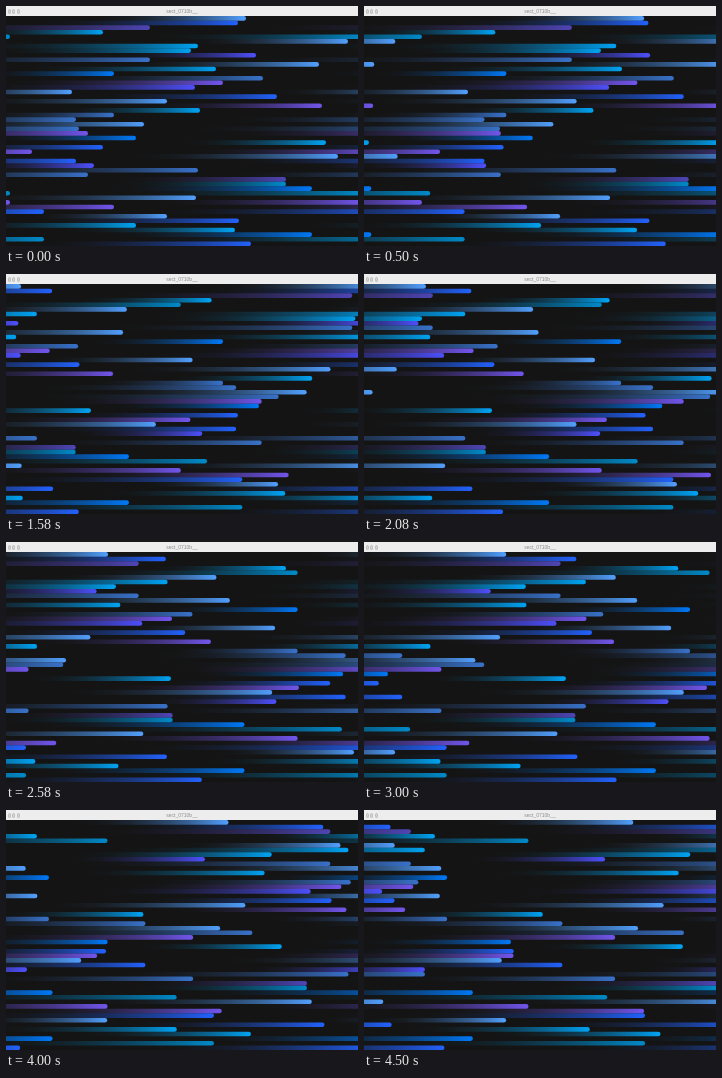
Write an HTML page with a canvas that moves like this. It is 352 by 240 pixels and loops after 4.58 s.

```html
<!DOCTYPE html>
<html lang="en">
<head>
<meta charset="utf-8">
<title>Streaks</title>
<style>
  html, body { margin: 0; width: 352px; height: 240px; overflow: hidden; background: #141414; }
  canvas { position: absolute; left: 0; top: 0; }
  header {
    position: absolute; left: 0; top: 0; width: 352px; height: 10px;
    background: #ededed; color: #8c8c8c;
    font: 5px/10.5px "Liberation Sans", Arial, sans-serif; text-align: center;
  }
  i {
    position: absolute; top: 2.5px; width: 3px; height: 5px; box-sizing: border-box;
    border: .5px solid #bcbcbc; border-radius: 50%; background: #dadada;
  }
</style>
</head>
<body>
<canvas id="stage" width="352" height="240"></canvas>
<header><i style="left:2px"></i><i style="left:6.3px"></i><i style="left:10.6px"></i>sect_0710b__</header>
<script>
const W = 352, H = 240, LOOP = 4580, LAST = 54;
const RADIUS = 2.3, TOP = 12.4, GAP = 4.6;
const AGE = 849;  // ticks the streaks have already run when the loop starts
const TAIL = 38;  // ticks until a trail has faded out
const SKIPS = [25, 34, 49]; // steps that jump one step further

// Path run by each streak before the loop starts: gives its place and its speed
const runs = [
  3408, 4456, 5424, 2913, 4580, 3510, 5120, 4409, 3066, 5424,
  4185, 4082, 2924, 4481, 4793, 4765, 3234, 4143, 4385, 3836,
  3010, 2924, 4294, 4362, 5353, 4658, 3298, 3136, 3617, 4250,
  4556, 4294, 2904, 5120, 4658, 3800, 3800, 4530, 5284, 4766,
  4580, 4684, 5318, 2977, 4457, 4002, 3749, 4530, 5318, 4821];

const palette = {
  light: "80,156,248", blue: "34,96,248", violet: "78,68,178", purple: "112,84,232",
  cyan: "0,160,238", teal: "0,136,198", steel: "56,112,198", azure: "0,118,242",
  indigo: "76,78,246"
};
const hues = `
  light blue violet cyan teal light cyan cyan indigo steel
  light cyan azure steel purple indigo light blue light purple
  cyan steel steel light steel purple azure cyan blue purple
  light blue indigo steel steel violet teal azure teal light
  purple purple blue light blue cyan cyan azure teal blue`.trim().split(/\s+/);

const ctx = document.getElementById("stage").getContext("2d");

function streak(x, y, length, rgb) {
  const fill = ctx.createLinearGradient(x, 0, x - length, 0);
  for (let u = 0; u <= 1; u += 0.125) {
    fill.addColorStop(u, `rgba(${rgb},${(1 - u) ** 2})`);
  }
  ctx.strokeStyle = fill;
  ctx.beginPath();
  ctx.moveTo(x - length, y);
  ctx.lineTo(x, y);
  ctx.stroke();
}

function draw(ms) {
  const step = Math.min(LAST, Math.floor((ms + 5) * 12 / 1000));
  const ticks = (step + SKIPS.filter(s => s <= step).length) * 5 / 3;
  ctx.fillStyle = "#141414";
  ctx.fillRect(0, 0, W, H);
  ctx.lineWidth = 2 * RADIUS;
  ctx.lineCap = "round";
  runs.forEach((run, i) => {
    const speed = run / AGE;
    const x = (run - RADIUS + speed * ticks) % W;
    const y = TOP + GAP * i;
    for (const lap of [W, 0]) streak(x + lap, y, speed * TAIL, palette[hues[i]]);
  });
}

const begin = performance.now();
function tick() {
  draw((performance.now() - begin) % LOOP);
  requestAnimationFrame(tick);
}
tick();
</script>
</body>
</html>
```
